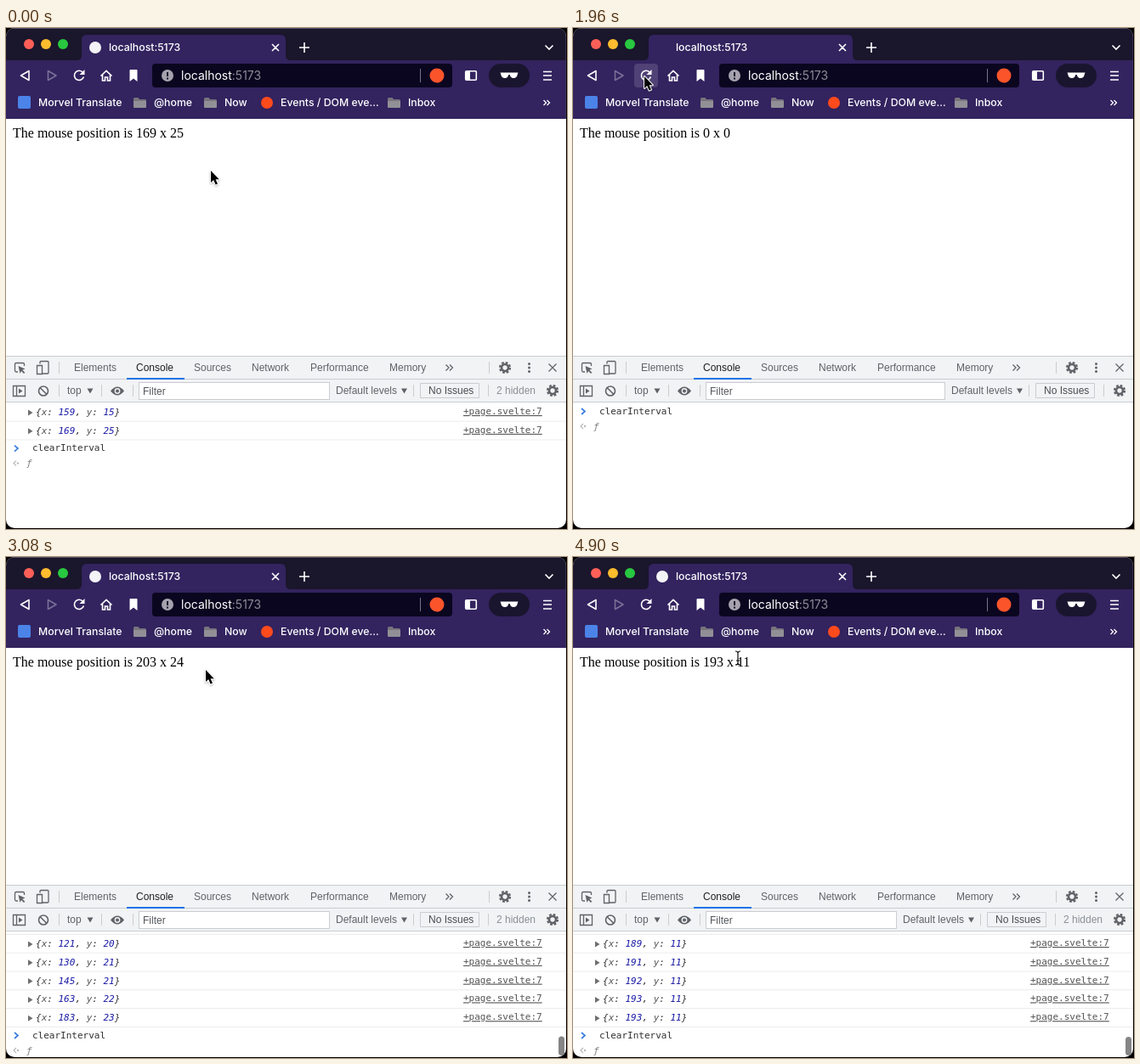
Write an HTML page that moves like this. It is 660 px wide and 590 px high and loops after 4.97 s.

```html
<!DOCTYPE html>
<html lang="en">
<head>
<meta charset="utf-8">
<title>Mouse position</title>
<style>
  html, body { margin: 0; width: 100%; height: 100%; overflow: hidden; background: #000; }
  svg { display: block; width: 660px; height: 590px; }
  text { white-space: pre; }
  .ui { font: 500 12.3px Inter, sans-serif; fill: #fff; }
  .url { font: 14px Inter, sans-serif; fill: #fff; }
  .page { font: 16px "Liberation Serif", serif; }
  .dev { font: 12px "Liberation Sans", sans-serif; fill: #5f6368; }
  .mono { font: 11px "DejaVu Sans Mono", monospace; fill: #303030; }
  .obj { font-style: italic; }
  .key { fill: #565656; }
  .num { fill: #1a1aa6; }
  .link { fill: #545454; text-decoration: underline; }
  .line { fill: none; stroke: #fff; stroke-width: 1.6; }
  .thin { fill: none; stroke: #5f6368; stroke-width: 1.3; }
  .rule { fill: none; stroke: #cacdd1; }
</style>
</head>
<body>
<svg viewBox="0 0 660 590">
  <defs>
    <clipPath id="window"><rect width="659" height="589" rx="10"/></clipPath>
    <clipPath id="console"><rect y="441" width="659" height="148"/></clipPath>
    <filter id="shadow" x="-50%" y="-50%" width="200%" height="200%">
      <feDropShadow dx="0" dy="1" stdDeviation="1" flood-opacity=".35"/>
    </filter>
    <g id="folder">
      <path d="M0 1.5Q0 0 1.5 0H5.5L7 2H13.5Q15 2 15 3.500V10.500Q15 12 13.500 12H1.500Q0 12 0 10.500Z" fill="#77747c"/>
      <path d="M0 4H15V10.500Q15 12 13.500 12H1.500Q0 12 0 10.500Z" fill="#929096"/>
    </g>
    <g id="gear" fill="none" stroke="#5f6368">
      <circle r="4" stroke-width="2.600"/>
      <circle r="6" stroke-width="2.200" stroke-dasharray="2.700 2.012"/>
    </g>
  </defs>

  <g clip-path="url(#window)">
    <rect width="660" height="590" fill="#fff"/>

    <!-- tab strip -->
    <rect width="660" height="38" fill="#1a162b"/>
    <path d="M0 .5H660" stroke="#55505f"/>
    <path d="M83 38Q89 38 89 32V14Q89 8 95 8H323Q329 8 329 14V32Q329 38 335 38Z" fill="#33235f"/>
    <circle cx="27" cy="19" r="6" fill="#fe5f57"/>
    <circle cx="47" cy="19" r="6" fill="#febc2e"/>
    <circle cx="67" cy="19" r="6" fill="#28c840"/>
    <circle id="favicon" cx="105" cy="23" r="7" fill="#f4f3f7"/>
    <text class="ui" x="121" y="27.300">localhost:5173</text>
    <path class="line" d="M313 19l8 8m0-8l-8 8M345 23h12m-6-6v12M634.500 20.500l4.500 4.500 4.500-4.500"/>

    <!-- toolbar -->
    <rect y="38" width="660" height="69" fill="#33235f"/>
    <rect id="reload" x="72" y="42" width="28" height="28" rx="4" fill="#fff" fill-opacity=".14"/>
    <path class="line" d="M27 50.500V61.500L17.500 56Z" stroke-linejoin="round"/>
    <path class="line" d="M49.500 50.500V61.500L59 56Z" stroke-linejoin="round" opacity=".35"/>
    <path class="line" d="M90.500 52.500A5.600 5.600 0 1 0 91.400 57.500"/>
    <path d="M92.500 49V55H86.500Z" fill="#fff"/>
    <path class="line" d="M111.500 56.500L118 50.300 124.500 56.500M113.500 55V62H116.500V58H119.500V62H122.500V55"/>
    <path d="M145.500 50Q145.500 49 146.500 49H153.500Q154.500 49 154.500 50V63L150 59.500 145.500 63Z" fill="#fff"/>
    <rect x="172" y="42" width="353" height="28" rx="4" fill="#0b061f"/>
    <circle cx="190" cy="56" r="7" fill="#a5a2ae"/>
    <path d="M190 52V57M190 58.500V60.500" stroke="#0b061f" stroke-width="1.800"/>
    <text class="url" x="206" y="61">localhost<tspan fill="#8d8a98">:5173</tspan></text>
    <path d="M487.500 48V64" stroke="#77738a"/>
    <circle cx="507" cy="56" r="8.500" fill="#fb542b"/>
    <rect class="line" x="540.700" y="50.700" width="12.600" height="10.600" rx="1"/>
    <path d="M541 51H546V61H541Z" fill="#fff"/>
    <rect x="568" y="42" width="48" height="28" rx="14" fill="#1a152e"/>
    <path d="M581.500 52.500H602.500L601.800 54.500Q601 59 597 59Q593.500 59 592.800 55H591.200Q590.500 59 587 59Q583 59 582.200 54.500Z" fill="#fff"/>
    <path class="line" d="M632 51.500h10m-10 4.500h10m-10 5h10"/>

    <!-- bookmarks -->
    <rect id="home" x="144" y="75" width="81" height="26" rx="4" fill="#fff" fill-opacity=".06"/>
    <rect x="14" y="80" width="15" height="15" rx="2" fill="#4b83e8"/>
    <circle cx="307" cy="88" r="7" fill="#ff4a1c"/>
    <use href="#folder" x="150" y="82"/>
    <use href="#folder" x="233" y="82"/>
    <use href="#folder" x="449" y="82"/>
    <g class="ui">
      <text x="38" y="92">Morvel Translate</text>
      <text x="174" y="92">@home</text>
      <text x="257" y="92">Now</text>
      <text x="323" y="92">Events / DOM eve…</text>
      <text x="473" y="92">Inbox</text>
    </g>
    <path class="line" d="M632.500 85l3 3-3 3m4-6l3 3-3 3" style="stroke-width:1.300"/>

    <text id="label" class="page" x="8" y="129"></text>

    <!-- developer tools -->
    <rect y="386" width="660" height="55" fill="#f1f3f4"/>
    <path class="rule" d="M0 386.500H660M0 413.500H660M0 440.500H660M62.500 393V407M568.500 393V407M62.500 420V434M112.500 420V434M149.500 420V434"/>
    <path d="M142 412H210V414H142Z" fill="#1a73e8"/>
    <path class="thin" d="M14 405H12Q10.500 405 10.500 403.500V396Q10.500 394.500 12 394.500H20Q21.500 394.500 21.500 396V398"/>
    <path d="M14.500 398L22.500 401.500 19.300 402.700 22.300 405.700 21 407 18 404 16.500 407Z" fill="#5f6368"/>
    <path class="thin" d="M40 395.500V393.500Q40 392.500 41 392.500H49Q50 392.500 50 393.500V406Q50 407 49 407H43M36.500 397.500H42.500V407.500H36.500Z"/>
    <g class="dev">
      <text x="80" y="404">Elements</text>
      <text x="153" y="404" fill="#202124" style="fill:#202124">Console</text>
      <text x="221" y="404">Sources</text>
      <text x="289" y="404">Network</text>
      <text x="358" y="404">Performance</text>
      <text x="451" y="404">Memory</text>
      <text x="72" y="431">top</text>
    </g>
    <path class="thin" d="M517.500 396.500l3.500 3.500-3.500 3.500m4.500-7l3.500 3.500-3.500 3.500M638.500 395.500l9 9m0-9l-9 9"/>
    <use href="#gear" x="587" y="400"/>
    <g fill="#5f6368">
      <circle cx="615.500" cy="395.500" r="1.500"/><circle cx="615.500" cy="400" r="1.500"/><circle cx="615.500" cy="404.500" r="1.500"/>
    </g>
    <path class="thin" d="M8.500 421.500H22.500V433.500H8.500ZM12.500 421.500V433.500"/>
    <path d="M15 424.500V430.500L19.500 427.500ZM95.500 424.500H102.500L99 430.500Z" fill="#5f6368"/>
    <circle class="thin" cx="44" cy="427.500" r="5.500" style="stroke-width:1.600"/>
    <path class="thin" d="M40 423.500L48 431.500" style="stroke-width:1.600"/>
    <path d="M123 427.500Q131 417.500 139 427.500Q131 437.500 123 427.500Z" fill="#5f6368"/>
    <circle cx="131" cy="427.500" r="2.700" fill="#5f6368" stroke="#f1f3f4" stroke-width="1.400"/>
    <rect id="filter" class="rule" x="156.500" y="417.500" height="20" style="fill:#fff"/>
    <text class="dev" x="161" y="432" style="fill:#55585c">Filter</text>
    <g id="levels">
      <text class="dev" x="388" y="431">Default levels</text>
      <path d="M465 424.500H472L468.500 430.500Z" fill="#5f6368"/>
      <path class="rule" d="M479.500 420V434M567.500 420V434M487.500 418.500H556.500V435.500H487.500Z"/>
      <text class="dev" x="497" y="431" style="fill:#4a4d51">No Issues</text>
    </g>
    <text id="hidden" class="dev" x="577" y="431" style="fill:#8b9095">2 hidden</text>
    <use href="#gear" x="643" y="427"/>

    <!-- console -->
    <g clip-path="url(#console)">
      <g id="rows"></g>
      <g id="prompt" class="mono">
        <path d="M10 7.500l4 3.500-4 3.500" fill="none" stroke="#3b7de0" stroke-width="1.700"/>
        <text x="31" y="14">clearInterval</text>
        <path d="M12 25.500l-3 3 3 3" fill="none" stroke="#b8b8b8" stroke-width="1.200"/>
        <circle cx="14" cy="28.500" r="1.200" fill="#b8b8b8"/>
        <text class="obj" x="24" y="32" style="fill:#808080">ƒ</text>
      </g>
      <rect id="thumb" x="650" width="7" rx="3.500" fill="#858585"/>
    </g>
    <path d="M658.500 0V107" stroke="#4b4266" stroke-opacity=".6"/>
  </g>

  <g id="cursor">
    <path id="arrow" d="M0 0V14L3.200 11 5.600 16.600 8 15.600 5.600 10.200H9.800Z" stroke="#fff" stroke-width="1.900" paint-order="stroke" stroke-linejoin="round" filter="url(#shadow)"/>
    <g id="beam" fill="none">
      <path id="bar" d="M-3-8Q0-8 0-6V6Q0 8-3 8M3-8Q0-8 0-6M0 6Q0 8 3 8M-2 3H2" stroke="#fff" stroke-opacity=".7" stroke-width="2.600"/>
      <path d="M-3-8Q0-8 0-6V6Q0 8-3 8M3-8Q0-8 0-6M0 6Q0 8 3 8M-2 3H2" stroke="#000" stroke-width="1.150"/>
    </g>
  </g>
</svg>

<script>
const LOOP = 4970, TICK = 70, STEP = 14;
const PAGE_TOP = 107, VIEW_TOP = 441, VIEW = 148, ROW = 21.8, TAIL = 36;
const RELOAD = 1820, READY = 2100, FIRST_MOVE = 2436;
const $ = id => document.getElementById(id);

// Pointer strokes: start time, then page x, y every STEP ms.
const strokes = [
  [0, 241, 61], [560, 228, 50], [840, 156, 21], [910, 150, 15],
  [1190, 110, -22], [1540, 85, -49], [1960, 84, -50], [2240, 86, -48], [2436, 112, 2],
  [2548, 139, 20, 143, 21, 149, 21, 152, 22, 157, 22, 172, 21], [2660, 183, 21],
  [2830, 222, 24], [2960, 120, 20], [3080, 235, 26], [3200, 115, 20], [3290, 240, 25], [3374, 178, 21],
  [3388, 180, 21, 186, 21, 194, 21, 204, 22, 216, 23, 228, 24], [3479, 243, 25], [3500, 230, 25],
  [3580, 150, 18], [3690, 270, 24], [3800, 140, 16], [4018, 296, 22],
  [4032, 282, 21, 267, 20, 253, 18, 237, 15, 220, 9, 200, -14, 184, -8, 176, 5],
  [4200, 130, 12], [4300, 230, 20], [4430, 150, 14], [4740, 180, 11],
  [4802, 189, 11, 191, 11, 192, 11, 193, 11, 193, 11], [4900, 194, 12], [4970, 195, 13]
];
const knots = strokes.flatMap(([t, ...p]) =>
  p.flatMap((x, i) => i % 2 ? [] : [[t + i / 2 * STEP, x, p[i + 1]]]));

const slope = (i, k) => {
  const a = knots[i], b = knots[i + 1];
  return a && b ? (b[k] - a[k]) / (b[0] - a[0]) : 0;
};
const tangent = (i, k) => {
  const a = slope(i - 1, k), b = slope(i, k);
  return a * b > 0 ? 2 * a * b / (a + b) : 0;
};

// Monotone cubic through the knots.
function pointer(t) {
  let i = 0;
  while (i < knots.length - 2 && knots[i + 1][0] <= t) i++;
  const a = knots[i], b = knots[i + 1], h = b[0] - a[0], u = (t - a[0]) / h, v = 1 - u;
  return [1, 2].map(k =>
    a[k] * (1 + 2 * u) * v * v + b[k] * u * u * (3 - 2 * u) +
    h * u * v * (tangent(i, k) * v - tangent(i + 1, k) * u));
}

const moves = [];
for (let t = FIRST_MOVE; t < LOOP; t += STEP) {
  const [x, y] = pointer(t).map(Math.round);
  if (y >= 0) moves.push({ t, x, y });
}
const slow = [{ t: -2, x: 159, y: 15 }, { t: -1, x: 169, y: 25 }, { t: 840, x: 156, y: 21 }];

const until = (list, t) => list.filter(m => m.t <= t);
const show = (id, on) => $(id).setAttribute('display', on ? 'inline' : 'none');
const move = (id, x, y, s = 1) => $(id).setAttribute('transform', `translate(${x} ${y}) scale(${s})`);
const clamp = v => Math.max(0, Math.min(1, v));
const ease = v => v * v * (3 - 2 * v);
const inside = ([x, y], l, t, r, b) => x >= l && x <= r && y >= t && y <= b;

const rowMarkup = ({ x, y }, top) => `<g class="mono" transform="translate(0 ${top})">
  <path d="M26 8.500V15.500L31.500 12Z" fill="#6e6e6e"/>
  <text class="obj" x="35" y="15">{<tspan class="key">x</tspan>: <tspan class="num">${x}</tspan>, <tspan class="key">y</tspan>: <tspan class="num">${y}</tspan>}</text>
  <text class="link" x="538" y="14">+page.svelte:7</text>
  <path d="M0 22.200H659" stroke="#ececec"/></g>`;

function drawConsole(logs) {
  const n = logs.length, height = n * ROW + TAIL, scroll = Math.max(0, height - VIEW);
  const top = i => VIEW_TOP + i * ROW - scroll;
  const from = Math.max(0, n - 7);
  $('rows').innerHTML = logs.slice(from).map((m, i) => rowMarkup(m, top(from + i))).join('');
  move('prompt', 0, top(n) - .5);
  const size = Math.max(22, VIEW * VIEW / height);
  show('thumb', scroll > 0);
  $('thumb').setAttribute('y', 587 - size);
  $('thumb').setAttribute('height', size);
}

function drawCursor(t, [x, y], textEnd) {
  const grow = ease(clamp((t - 3220) / 210)) * (1 - ease(clamp((t - 3640) / 280)));
  const beam = inside([x, y], 8, 8, textEnd, 27);
  show('beam', beam);
  show('arrow', !beam);
  move('cursor', x, y + PAGE_TOP, 1 + 1.65 * grow);
}

function draw(t) {
  const fresh = t >= RELOAD, loading = fresh && t < READY;
  const seen = until(fresh ? moves : slow, fresh ? t - 3 * STEP : t);
  const logs = fresh ? until(moves, t - (t < 3800 ? 4 : 3) * STEP) : seen;
  const { x, y } = seen[seen.length - 1] || { x: 0, y: 0 };
  $('label').textContent = `The mouse position is ${x} x ${y}`;

  const [px, py] = pointer(Math.max(0, t - STEP)), over = [px, py + PAGE_TOP];
  show('reload', inside(over, 72, 42, 100, 70));
  show('home', inside(over, 144, 75, 225, 101));
  show('favicon', !loading);
  show('hidden', !loading);
  $('filter').setAttribute('width', loading ? 281 : 224);
  move('levels', loading ? 57 : 0, 0);

  drawConsole(logs);
  drawCursor(t, pointer(t), 8 + $('label').getComputedTextLength());
}

let last = -1;
function frame() {
  const t = Math.floor(performance.now() % LOOP / TICK) * TICK;
  if (t !== last) draw(last = t);
  requestAnimationFrame(frame);
}
frame();
</script>
</body>
</html>
```
